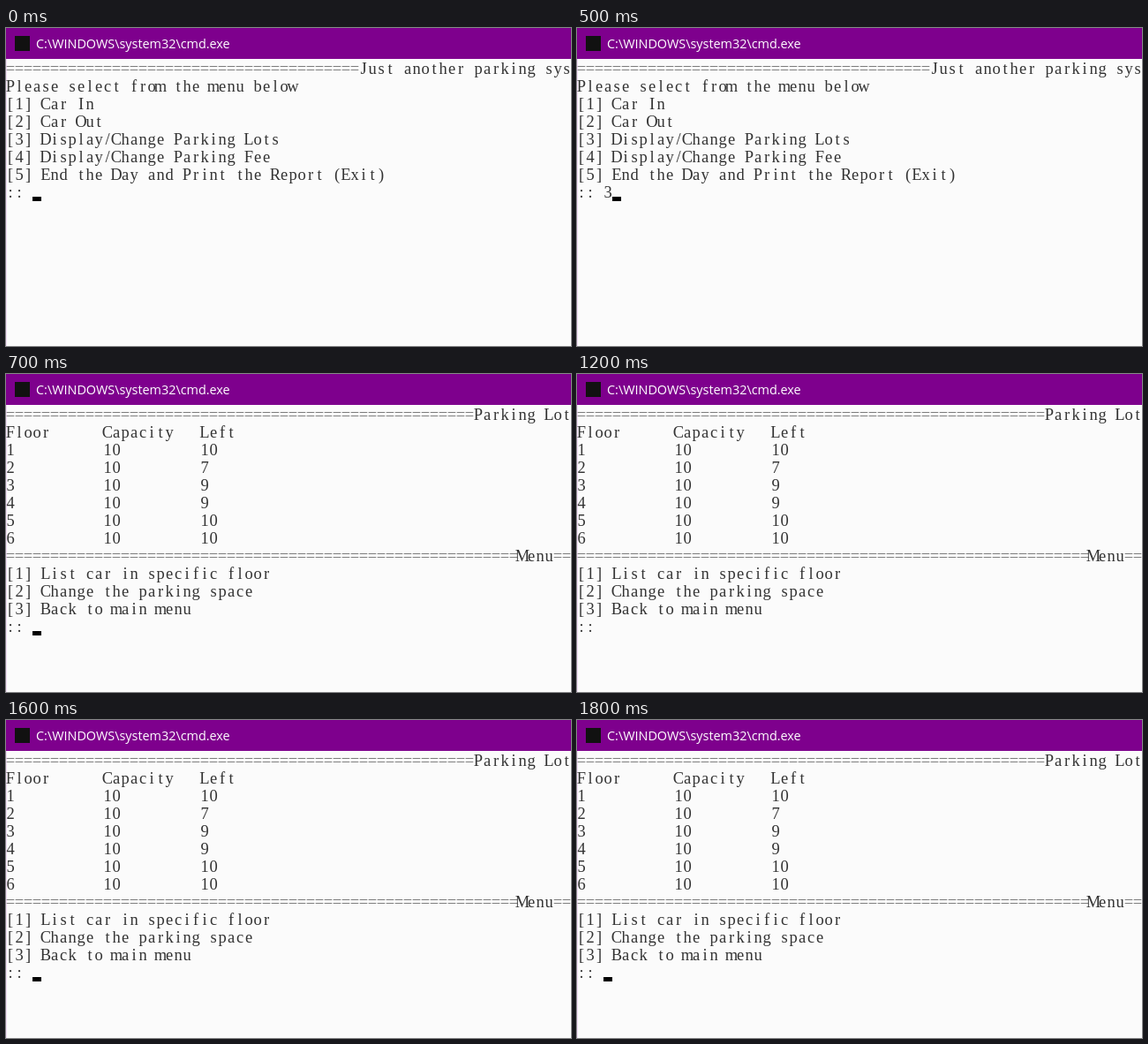
Animation of 640 by 360 pixels, one loop 1900 ms. Source, as an HTML page:

```html
<!DOCTYPE html>
<html lang="en">
<head>
<meta charset="utf-8">
<title>Parking console</title>
<style>
  html, body { margin: 0; width: 100%; height: 100%; overflow: hidden; background: #fbfbfb; }
  svg { display: block; width: 640px; height: 360px; }
  .title { font: 14.4px "Open Sans", "Noto Sans", sans-serif; fill: #fff; }
  .cell {
    font: 18.5px "Liberation Serif", "Noto Serif", serif;
    font-variant-ligatures: none;
    font-kerning: none;
    text-anchor: middle;
    white-space: pre;
    fill: #333;
  }
  .rule { fill: #777; }
</style>
</head>
<body>
<svg id="stage" viewBox="0 0 640 360">
  <rect width="640" height="360" fill="#fbfbfb"/>
  <rect y="35" width="1" height="325" fill="#f1dcf5"/>
  <rect width="640" height="35" fill="#7e008d"/>
  <rect x="10" y="9" width="17" height="17" fill="#111"/>
  <text class="title" x="34" y="22.5">C:\WINDOWS\system32\cmd.exe</text>
  <g id="main"></g>
  <g id="lots"></g>
  <rect id="cursor" width="10" height="5" fill="#000"/>
</svg>
<script>
const NS = "http://www.w3.org/2000/svg";
const LOOP = 1900, CELL = 10, ROW = 20, COLS = 64;
const $ = id => document.getElementById(id);

// Each character is centred in its own console cell.
function put(parent, str, col, row, cls = "") {
  const el = document.createElementNS(NS, "text");
  const shown = str.slice(0, COLS - col);
  el.setAttribute("class", "cell " + cls);
  el.setAttribute("x", [...shown].map((_, i) => (col + i + 0.5) * CELL).join(" "));
  el.setAttribute("y", 52 + row * ROW);
  el.textContent = shown;
  parent.appendChild(el);
  return el;
}

function heading(parent, label, col, row) {
  put(parent, "=".repeat(col), 0, row, "rule");
  put(parent, label, col, row);
  const end = col + label.length;
  if (end < COLS) put(parent, "=".repeat(COLS - end), end, row, "rule");
}

const lines = (parent, list, row) => list.forEach((s, i) => put(parent, s, 0, row + i));
const menu = items => items.map((s, i) => `[${i + 1}] ${s}`).concat("::");
const record = (a, b, c) => String(a).padEnd(11) + String(b).padEnd(11) + c;

heading($("main"), "Just another parking system", 40, 0);
lines($("main"), ["Please select from the menu below", ...menu([
  "Car In",
  "Car Out",
  "Display/Change Parking Lots",
  "Display/Change Parking Fee",
  "End the Day and Print the Report (Exit)"
])], 1);
const typed = put($("main"), "3", 3, 7);

heading($("lots"), "Parking Lot", 53, 0);
lines($("lots"), [
  record("Floor", "Capacity", "Left"),
  ...[10, 7, 9, 9, 10, 10].map((left, i) => record(i + 1, 10, left))
], 1);
heading($("lots"), "Menu", 58, 8);
lines($("lots"), menu([
  "List car in specific floor",
  "Change the parking space",
  "Back to main menu"
]), 9);

const show = (el, on) => el.setAttribute("visibility", on ? "visible" : "hidden");

function draw(t) {
  const onMain = t < 700;
  const hasKey = onMain && t >= 500;
  const blinkOff = (t >= 300 && t < 500) || (t >= 1200 && t < 1600);
  show($("main"), onMain);
  show($("lots"), !onMain);
  show(typed, hasKey);
  show($("cursor"), !blinkOff);
  $("cursor").setAttribute("x", (hasKey ? 4 : 3) * CELL);
  $("cursor").setAttribute("y", 51 + (onMain ? 7 : 12) * ROW);
}

let start;
function frame(now) {
  start ??= now;
  draw((now - start) % LOOP);
  requestAnimationFrame(frame);
}
draw(0);
requestAnimationFrame(frame);
</script>
</body>
</html>
```
